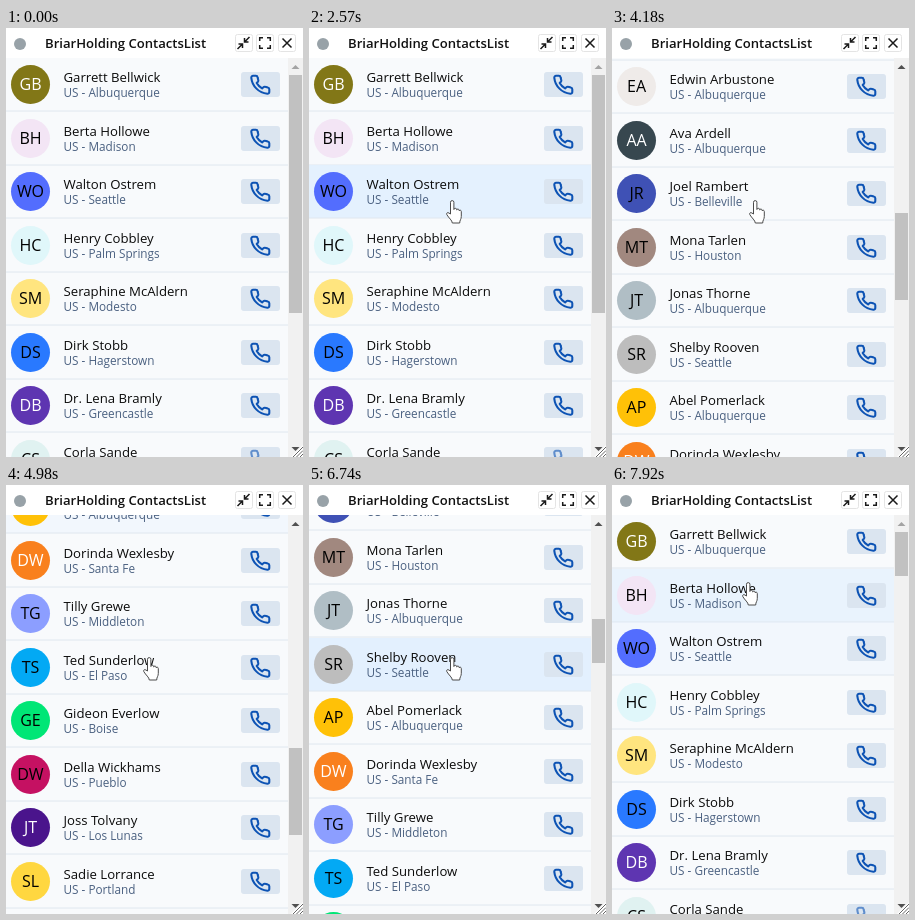
An HTML page that plays this animation: 297 px wide and 429 px high, repeating every 8000 ms.

```html
<!DOCTYPE html>
<html lang="en">
<head>
<meta charset="utf-8">
<title>Contacts list</title>
<style>
  html, body { margin: 0; width: 100%; height: 100%; overflow: hidden; background: #fff; }
  svg { display: block; width: 100vw; height: 100vh; font-family: "Open Sans", "Noto Sans", sans-serif; }
  .title { font-size: 13.1px; font-weight: 600; fill: #111; }
  .name { font-size: 13.2px; fill: #0b0b0b; }
  .place { font-size: 11.75px; fill: #4a6080; }
  .initials { font-size: 16px; text-anchor: middle; }
  .line { fill: none; stroke: #1a1a1a; stroke-width: 1.5; }
  .tool { fill: #fff; stroke: #e4e4e4; }
</style>
</head>
<body>
<svg viewBox="0 0 297 429">
  <defs>
    <path id="phone" d="M7 2H4a2 2 0 0 0-2 2.2A20 20 0 0 0 19.8 22 2 2 0 0 0 22 20v-3a2 2 0 0 0-1.7-2l-2.8-.7a2 2 0 0 0-2.1.5L14 16a16 16 0 0 1-6-6l1.3-1.3a2 2 0 0 0 .4-2.1L9 3.7A2 2 0 0 0 7 2z"/>
    <clipPath id="view"><rect y="30" width="282" height="399"/></clipPath>
  </defs>

  <rect width="297" height="429" fill="#fff"/>
  <rect y="30" width="282" height="399" fill="#f8fafc"/>
  <g clip-path="url(#view)"><g id="list"></g></g>

  <g id="scrollbar">
    <rect x="282" y="30" width="15" height="399" fill="#f1f1f1"/>
    <rect id="thumb" x="283" width="13" fill="#c1c1c1"/>
    <path id="up" d="M285.5 41h8l-4-4z"/>
    <path id="down" d="M285.5 419h8l-4 4z"/>
    <path d="M285 429l12-12v12z" fill="#fff"/>
    <path d="M287 429l10-10M290.5 429l6.5-6.5M294 429l3-3" stroke="#666" fill="none"/>
  </g>

  <g id="header">
    <circle cx="14" cy="16" r="6" fill="#98a2a8"/>
    <text class="title" x="39" y="20">BriarHolding ContactsList</text>
    <rect class="tool" x="229.5" y="6.5" width="17" height="17" rx="2"/>
    <rect class="tool" x="250.5" y="6.5" width="17" height="17" rx="2"/>
    <rect class="tool" x="272.5" y="6.5" width="17" height="17" rx="2"/>
    <path class="line" d="M243.5 9l-5 5M238.5 10v4h4M231.5 21l5-5M232.5 16h4v4"/>
    <path class="line" d="M253.7 13v-3.3h3.3M261 9.7h3.3v3.3M264.3 17v3.3h-3.3M257 20.3h-3.3v-3.3"/>
    <path class="line" d="M276.5 10.5l9 9M285.5 10.5l-9 9"/>
  </g>

  <path id="hand" fill="#fff" stroke="#4a4a4a" stroke-linejoin="round" d="M4.5 14V2.3a1.7 1.7 0 0 1 3.4 0V9.5c0-1.6 2.8-1.6 2.8 0v.6c0-1.4 2.5-1.3 2.5.2v.7c.3-1.2 2.1-1 2.1.4v5c0 3-1.6 3.6-1.6 6.6H6.3c0-2.6-3.6-5-5.5-8.4-.8-1.6 1-2.6 2.2-1.5z"/>
</svg>

<script>
const LOOP = 8000, TICK = 80, FADE = 240, FADE_STEPS = 12;
const TOP = 30, VIEW = 399, ROW = 53.5, FOOT = 78, LIST_WIDTH = 282;
const TRACK_TOP = 47, TRACK = 365;
const DISABLED = 7;
const $ = id => document.getElementById(id);

// name | place | avatar colour | initials colour (black unless given)
const contacts = `Garrett Bellwick|Albuquerque|#827717|#fff
Berta Hollowe|Madison|#f3e5f5
Walton Ostrem|Seattle|#536dfe
Henry Cobbley|Palm Springs|#e0f7fa
Seraphine McAldern|Modesto|#ffe57f
Dirk Stobb|Hagerstown|#2979ff
Dr. Lena Bramly|Greencastle|#5e35b1|#fff
Corla Sande|DeForest|#e0f2f1
Karina Nordel|Albuquerque|#b39ddb
Ms. Nora Gelph|Marshfield|#f9801d|#fff
Kirsa Dunnamer|Albuquerque|#fca62c|#fff
Roanna Fletchi|Madison|#fff59d
Edwin Arbustone|Albuquerque|#efebe9
Ava Ardell|Albuquerque|#37474f|#fff
Joel Rambert|Belleville|#3f51b5
Mona Tarlen|Houston|#a1887f
Jonas Thorne|Albuquerque|#b0bec5
Shelby Rooven|Seattle|#bdbdbd
Abel Pomerlack|Albuquerque|#ffc107
Dorinda Wexlesby|Santa Fe|#f9801d|#fff
Tilly Grewe|Middleton|#8c9eff
Ted Sunderlow|El Paso|#03a9f4
Gideon Everlow|Boise|#00e676
Della Wickhams|Pueblo|#c51162
Joss Tolvany|Los Lunas|#4a148c|#fff
Sadie Lorrance|Portland|#ffd740
Nils Hargove|Madison|#80cbc4
Petra Vanlow|Houston|#ff8a65
Oskar Mindel|Boise|#c5e1a5
Lidia Cranwe|Seattle|#7e57c2|#fff
Ruben Haldow|Pueblo|#81d4fa
Irma Fosdale|Modesto|#ffcc80`.split("\n").map(line => line.split("|"));

const initialsOf = name => {
  const words = name.split(" ");
  return words[0][0] + words[words.length - 1][0];
};

$("list").innerHTML = contacts.map(([name, place, fill, ink = "#000"], i) => `
  <g transform="translate(0 ${Math.round(i * ROW)})">
    <rect class="tint" width="${LIST_WIDTH}" height="53" fill="#e3f0fe"/>
    <path d="M0 53h${LIST_WIDTH}" stroke="#dfe7ef"/>
    <circle cx="24.5" cy="26.5" r="19.5" fill="${fill}"/>
    <text class="initials" x="24.5" y="32" fill="${ink}">${initialsOf(name)}</text>
    <text class="name" x="57.5" y="24">${name}</text>
    <text class="place" x="57.5" y="39">US - ${place}</text>
    <rect x="235" y="14" width="39" height="25" rx="3" fill="#dbe5f0"/>
    <use href="#phone" transform="translate(243.5 16) scale(.9)" fill="none" stroke="#0d53b4"
      stroke-width="2.3" stroke-linejoin="round" opacity="${i === DISABLED ? 0.6 : 1}"/>
  </g>`).join("");
const rows = [...$("list").children];
const tints = rows.map(row => row.querySelector(".tint"));

// Wheel flicks: each adds a distance and slows to a stop.
const flicks = [
  { start: 2640, end: 3040, by: 217 },
  { start: 3920, end: 4430, by: 628 },
  { start: 4800, end: 5505, by: 438 },
  { start: 6260, end: 6490, by: -496 },
  { start: 6720, end: 7440, by: -787 }
];
const entry = { x: 300, y: 275 };
const handMoves = [
  { start: 800, end: 1600, x: 146, y: 40 },
  { start: 1680, end: 1920, x: 136, y: 47 },
  { start: 2000, end: 2480, x: 137, y: 172 },
  { start: 7640, end: 7920, x: 130, y: 97 }
];

const progress = (t, { start, end }) => Math.min(1, Math.max(0, (t - start) / (end - start)));
const slowDown = p => Math.sin(p * Math.PI / 2);

const scrollAt = t => flicks.reduce((sum, flick) => sum + flick.by * slowDown(progress(t, flick)), 0);
const isScrolling = t => flicks.some(({ start, end }) => t > start && t < end);
const handAt = t => handMoves.reduce((from, move) => {
  const p = progress(t, move);
  return { x: from.x + (move.x - from.x) * p, y: from.y + (move.y - from.y) * p };
}, entry);
const loadedRows = t => t < 3280 ? 10 : t < 5680 ? 30 : 60;

function rowUnderHand(t) {
  const { x, y } = handAt(t);
  return isScrolling(t) || x > LIST_WIDTH ? -1 : Math.floor((y + 1 - TOP + scrollAt(t)) / ROW);
}

// The tint of a row is the share of the last FADE ms the hand spent on it.
function hoverLevels(t) {
  const levels = rows.map(() => 0);
  for (let i = 0; i < FADE_STEPS; i++) {
    const row = rowUnderHand(t - i * FADE / FADE_STEPS);
    if (row in levels) levels[row] += 1 / FADE_STEPS;
  }
  return levels;
}

function set(id, attributes) {
  for (const key in attributes) $(id).setAttribute(key, attributes[key]);
}

function draw(time) {
  const t = Math.floor(time % LOOP / TICK) * TICK;
  const scroll = scrollAt(t);
  const count = loadedRows(t);
  const content = count * ROW + FOOT;
  const levels = hoverLevels(t);
  const hand = handAt(t);
  const arrowFill = enabled => ({ fill: enabled ? "#505050" : "#a3a3a3" });

  rows.forEach((row, i) => {
    row.style.display = i < count ? "" : "none";
    tints[i].setAttribute("opacity", levels[i]);
  });
  set("list", { transform: `translate(0 ${Math.round(TOP - scroll)})` });
  set("thumb", {
    y: Math.floor(TRACK_TOP + scroll * TRACK / content),
    height: Math.round(VIEW * TRACK / content)
  });
  set("up", arrowFill(scroll > 0.5));
  set("down", arrowFill(scroll < content - VIEW - 2));
  set("hand", { transform: `translate(${Math.round(hand.x)} ${Math.round(hand.y)})` });
}

const begin = performance.now();
function frame() {
  draw(performance.now() - begin);
  requestAnimationFrame(frame);
}
frame();
</script>
</body>
</html>
```
